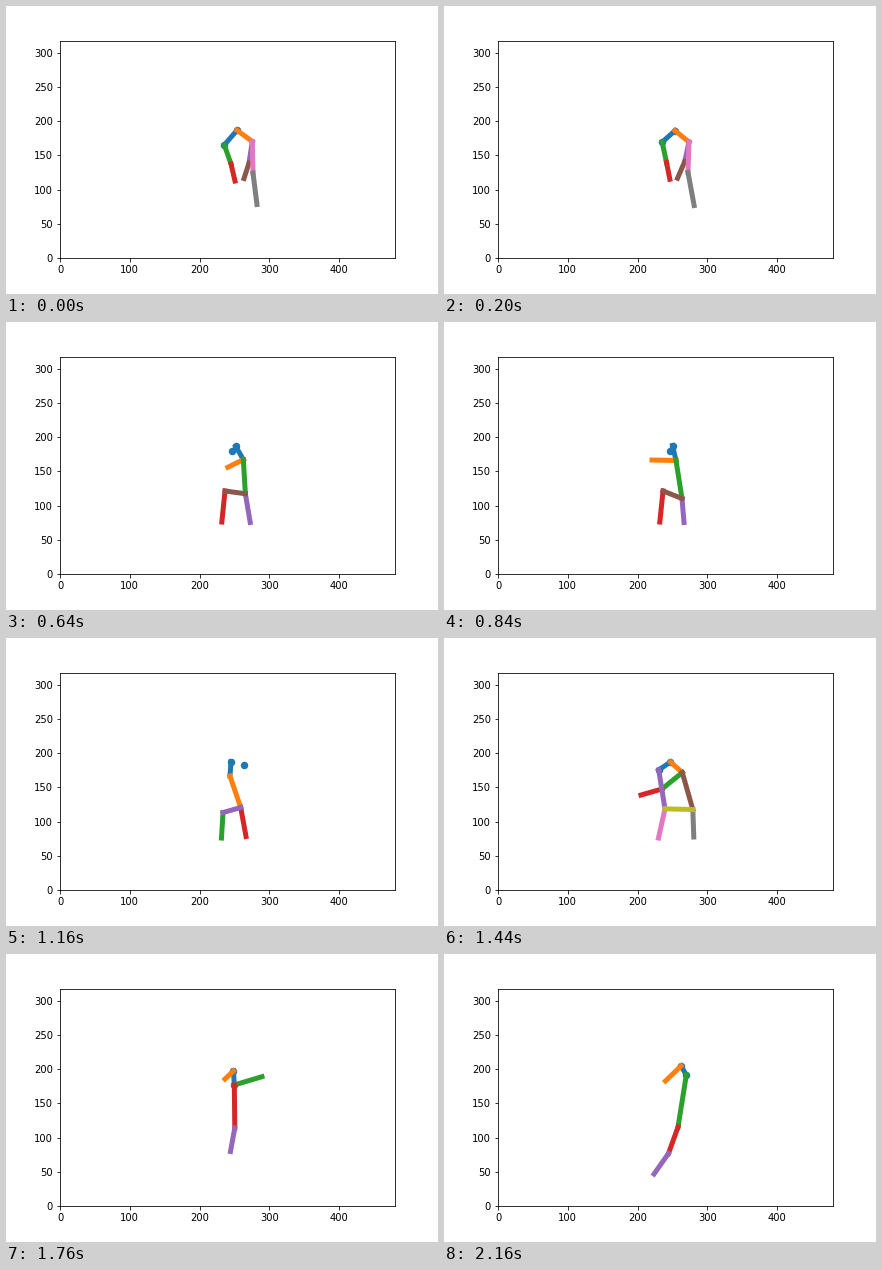
These frames come from a looping animation (432 by 288 pixels, 2200 ms). A matplotlib script:

```python
import matplotlib.pyplot as plt
import numpy as np
from matplotlib.animation import FuncAnimation

STEP = 40
FRAMES = 55

# Key poses: time in ms and the joints detected at that time.
# Suffix l / r marks the side of the body.
POSES = [
    (0, dict(neck=(253.8, 186.8), sh_l=(235.6, 165.3), sh_r=(275.7, 170.4),
             el_l=(245.2, 137.5), wr_l=(250.9, 112.6),
             el_r=(271, 139), wr_r=(263.8, 116.3),
             hip_r=(276.7, 124.3), knee_r=(282.4, 78.2))),
    (400, dict(neck=(253.8, 185.7), sh_l=(235.1, 173.6), sh_r=(272, 168.9),
               el_l=(238, 141.9), wr_l=(241.9, 117.7),
               el_r=(264.5, 143.3), wr_r=(250.9, 117),
               hip_r=(268.1, 125.8), knee_r=(280, 75.3))),
    (840, dict(neck=(250.2, 187.9), head=(246.9, 179.9), sh_r=(255.2, 166),
               el_r=(220.8, 166.7), hip_l=(236.6, 121.4), hip_r=(263.8, 110.4),
               knee_l=(232, 76), knee_r=(266.7, 75.3))),
    (1160, dict(neck=(245.2, 187.9), head=(263.8, 182.4), sh_r=(243.7, 166.7),
                hip_l=(233.7, 113.3), hip_r=(259.1, 120.6),
                knee_l=(231.5, 76), knee_r=(266.7, 78.2))),
    (1440, dict(neck=(247.3, 187.2), sh_l=(230.4, 175.5), sh_r=(264.2, 171.8),
                el_r=(235.1, 147.7), wr_r=(205, 138.9),
                hip_l=(239.4, 118.7), hip_r=(279.3, 117.7),
                knee_l=(230.1, 76), knee_r=(280.7, 77.5))),
    (1760, dict(neck=(248.7, 197.4), sh_l=(249.9, 177), sh_r=(236.6, 185.7),
                el_l=(289.6, 189.1), hip_l=(250.6, 114.1),
                knee_l=(244.4, 79.7))),
    (2160, dict(neck=(262.4, 204.7), sh_l=(270, 191.6), sh_r=(240.1, 182.8),
                hip_l=(258.1, 115.5), knee_l=(244.4, 76.8),
                ank_l=(223.7, 46.8))),
]

BONES = [
    ("neck", "sh_l"), ("neck", "sh_r"),
    ("sh_l", "el_l"), ("el_l", "wr_l"),
    ("sh_r", "el_r"), ("el_r", "wr_r"),
    ("sh_l", "hip_l"), ("sh_r", "hip_r"),
    ("hip_l", "knee_l"), ("knee_l", "ank_l"),
    ("hip_r", "knee_r"), ("hip_l", "hip_r"),
]


def joint_at(name, t):
    """Position of a joint, interpolated over the poses that contain it."""
    keys = [(time, *pose[name]) for time, pose in POSES if name in pose]
    times, xs, ys = zip(*keys)
    return np.interp(t, times, xs), np.interp(t, times, ys)


plt.rcParams.update({"font.family": "DejaVu Sans", "font.size": 10})
fig, ax = plt.subplots(figsize=(6, 4), dpi=72)
fig.subplots_adjust(left=0.125, right=0.9, bottom=0.125, top=0.88)
ax.set(xlim=(0, 480), ylim=(0, 318),
       xticks=np.arange(0, 401, 100), yticks=np.arange(0, 301, 50))

dots = ax.scatter([], [], s=36, color="C0", linewidths=1.5, zorder=1)
limbs = [ax.plot([], [], lw=5, color=f"C{i}", solid_capstyle="projecting")[0]
         for i in range(9)]


def draw(i):
    t = i * STEP
    _, pose = min(POSES, key=lambda p: abs(p[0] - t))
    pts = {name: joint_at(name, t) for name in pose}

    # Colours follow the order of the bones that are present.
    shown = [(pts[a], pts[b]) for a, b in BONES if a in pts and b in pts]
    for k, limb in enumerate(limbs):
        if k < len(shown):
            limb.set_data(*zip(*shown[k]))
        else:
            limb.set_data([], [])

    dots.set_offsets([pts["neck"], pts["head" if "head" in pts else "sh_l"]])
    return [dots, *limbs]


anim = FuncAnimation(fig, draw, frames=FRAMES, interval=STEP, repeat=True,
                     repeat_delay=0, blit=False)
plt.show()
```
